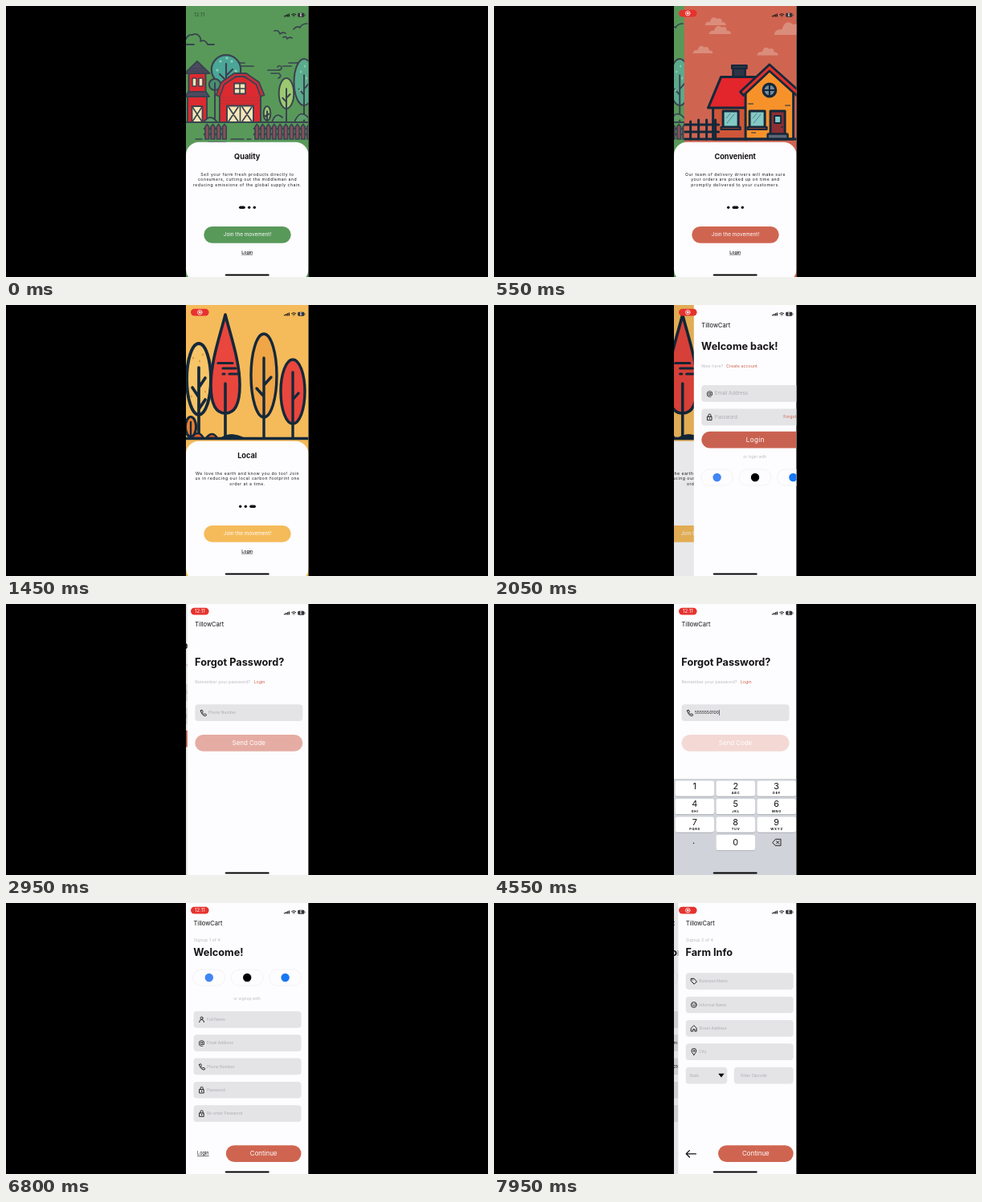
An HTML page with a canvas that plays this animation: 600x338 px, repeating every 8000 ms.

```html
<!DOCTYPE html>
<html lang="en">
<head>
<meta charset="utf-8">
<title>Farm app walkthrough</title>
<style>
html, body { margin: 0; width: 100%; height: 100%; overflow: hidden; background: #000; }
canvas { display: block; width: 600px; height: 338px; }
</style>
</head>
<body>
<canvas id="stage"></canvas>
<script>
const LOOP = 8000, L = 224, W = 152.4, H = 338;
const RED = '#cf6551', PAPER = '#fdfcfe', TEXT = '#151314', GREY = '#bdbbc0', FIELD = '#e4e3e6';
const BRAND = 'TillowCart', PHONE = '5555550100';
const canvas = document.getElementById('stage');
const ctx = canvas.getContext('2d');
const dpr = window.devicePixelRatio || 1;
canvas.width = 600 * dpr;
canvas.height = H * dpr;
let ink = '#000';

// --- helpers ---
const clamp = (v, a = 0, b = 1) => Math.min(b, Math.max(a, v));
const ramp = (t, a, b) => clamp((t - a) / (b - a));
const smooth = (t, a, b) => { const u = ramp(t, a, b); return u * u * (3 - 2 * u); };
const typed = (s, t, start, step) => s.slice(0, clamp(Math.floor((t - start) / step), 0, s.length));

function paint(fill, lw, p) {
  if (fill) { ctx.fillStyle = fill; p ? ctx.fill(p) : ctx.fill(); }
  if (lw) {
    ctx.strokeStyle = ink;
    ctx.lineWidth = lw;
    p ? ctx.stroke(p) : ctx.stroke();
  }
}
function path(d, fill, lw) { paint(fill, lw, new Path2D(d)); }
function oval(x, y, rx, ry, fill, lw) {
  ctx.beginPath();
  ctx.ellipse(x, y, rx, ry, 0, 0, 7);
  paint(fill, lw);
}
function box(x, y, w, h, r, fill, lw) {
  ctx.beginPath();
  ctx.roundRect(x, y, w, h, r);
  paint(fill, lw);
}
function txt(s, x, y, size, o = {}) {
  ctx.font = `${o.w || 400} ${size}px Inter, sans-serif`;
  ctx.letterSpacing = (o.ls || 0) + 'px';
  ctx.textAlign = o.a || 'left';
  ctx.textBaseline = 'middle';
  ctx.fillStyle = o.c || TEXT;
  ctx.fillText(s, x, y);
  const w = ctx.measureText(s).width;
  if (o.u) ctx.fillRect(o.a === 'center' ? x - w / 2 : x, y + size * .46, w, .6);
  return w;
}
const mid = (s, x, y, size, o) => txt(s, x, y, size, { a: 'center', ...o });

function button(s, y, alpha = 1, x = 233.5, w = 134, fill = RED, size = 7.9, ls = 0) {
  ctx.save();
  ctx.globalAlpha = alpha;
  box(x, y, w, 20.7, 10.3, fill);
  ctx.restore();
  mid(s, x + w / 2, y + 10.4, size, { c: '#fff', ls });
}

// --- illustrations ---
function fence(x0, x1) {
  path(`M${x0 - 1} 153H${x1}M${x0 - 1} 160H${x1}`, null, 2.6);
  for (let x = x0; x < x1 - 2; x += 7.2) path(`M${x} 166v-15.5l2.3-3l2.3 3v15.5z`, '#8a4f5c', 1.7);
}
function leafTree(x, y, rx, ry, fill, base) {
  oval(x, y, rx, ry, fill, 2);
  path(`M${x} ${y - ry * .3}V${base}M${x} ${y + ry * .3}l${rx * .5}-${ry * .25}M${x} ${y + ry * .55}l-${rx * .5}-${ry * .25}`, null, 2);
}
function farm() {
  ink = '#39434f';
  path('M224 41q3-6 8-5q5-3 9 2q2 3 1 6q6-3 9 4h8M224 48h10', null, 1.8);
  path('M286 71h11M289 75h19M326 80h12q6 0 5-4q-3-3-5 0M330 84h10q4 4-1 6M352 71h9q5-1 3 4M345 75h10', null, 1.7);
  path('M334 31q5-2 7 4q3-3 7-1M345 39q4-2 5 2q3-3 6-1M358 29q4-5 8-2q2-5 9-5', null, 1.7);
  // round trees
  oval(274, 79.3, 18.2, 18.2, '#4aa696', 2.2);
  path('M274 72v38M274 87l8-8M274 93l-8-8', null, 2.2);
  for (const [x, y] of [[267, 69], [281, 69], [286, 81], [263, 80], [275, 65]]) oval(x, y, 1.6, 1.6, '#8fd0b8');
  oval(260, 98, 7.2, 7, '#4b8f71', 2);
  path('M260 96v48', null, 2);
  // tower
  box(227.5, 84, 21, 24, 0, '#dc2a30', 2);
  path('M222.5 84L238 69L253.5 84z', '#4d4a61', 2);
  path('M231 78h14M228 81h20', null, 1);
  box(232, 90, 5, 10, 1, '#f5e5b6', 1.5);
  box(240, 90, 5, 10, 1, '#f5e5b6', 1.5);
  box(226, 112, 24, 33, 0, '#dc2a30', 2);
  path('M227 107h22l4 6h-30z', '#4d4a61', 1.8);
  box(231.5, 125, 13, 20, 0, '#f5e5b6', 1.8);
  path('M231.5 125l13 20M244.5 125l-13 20', null, 1.6);
  // barn
  path('M266 145V108L272 95L291.5 86L311 95L317 108V145z', '#dc2a30', 2);
  path('M261.5 111L268 95L284 84H299L315 95L321.5 111L317 113L311.5 98L297 88H286L271.5 98L266 113z', '#c82f3a', 1.8);
  ctx.save();
  ctx.globalAlpha = .35;
  for (let y = 114; y < 124; y += 4) path(`M268 ${y}h47`, null, .7);
  ctx.restore();
  box(284, 96.5, 14, 13, 0, '#f5e5b6', 1.8);
  path('M291 96.5v13M284 103h14', null, 1.5);
  box(275, 124.5, 33, 20.5, 0, '#f5e5b6', 2);
  path('M291.5 125v20M277 126l12 18M289 126l-12 18M294 126l12 18M306 126l-12 18', null, 1.7);
  // right side
  leafTree(371, 95, 12.5, 29, '#5aab8b', 145);
  leafTree(349, 109, 9.3, 19, '#9cc870', 145);
  leafTree(325, 134, 4.3, 9, '#9cc870', 145);
  for (const [x, y] of [[367, 82], [374, 90], [366, 105], [372, 75]]) oval(x, y, 1, 1.5, '#8fd0b8');
  path('M331 145q5-14 13-6M359 145q7-18 18-5M246 145q8-12 17 0', '#5f9f6a', 1.8);
  path('M223 145h154', null, 2.2);
  fence(248, 274);
  fence(310, 378);
  path('M236 166h8M280 166h16M300 166h5M252 170h22', null, 1.4);
}
function puff(x, y, s) {
  path(`M${x} ${y}q${s} ${-5 * s} ${6 * s} ${-4 * s}q${3 * s} ${-9 * s} ${9 * s} ${-4 * s}q${6 * s} ${-2 * s} ${6 * s} ${4 * s}q${5 * s} 0 ${5 * s} ${4 * s}z`, '#db8d7c');
}
function house() {
  ink = '#14283a';
  ctx.save();
  ctx.translate(32, 0);
  puff(218, 24, 1);
  puff(223, 35, 1.05);
  puff(304, 36, 1.6);
  puff(283, 61.5, 1);
  puff(203, 59, .95);
  oval(347, 126.5, 12, 15, '#43b35a', 3);
  path('M345 122v44', null, 2.5);
  box(253, 77, 15, 14, 0, '#2c3447', 2.6);
  box(251.5, 74, 18.5, 4, 0, '#2c3447', 2.2);
  box(228, 124, 42, 42, 0, '#cf5639', 3);
  path('M222 127L238 88.5H285L268 127z', '#e2262c', 3.2);
  path('M268.5 166V106L298.5 77L328 106V166z', '#f7922b', 3);
  path('M262 107L298.3 73L336 107L332 111.5L298.3 81L266 111.5z', '#e2302c', 2.8);
  oval(298.3, 105, 7.8, 7.8, '#75899f', 3.2);
  path('M298.3 98v14M291 105h15', null, 2);
  for (const x of [240.5, 273.5]) {
    box(x, 131, 19, 20, 0, '#85c9c6', 3);
    path(`M${x + 5} 147l10-12M${x + 4} 141l6-6`, '', 0);
    box(x - 2.5, 151, 24, 3, 0, '#8a4136', 2.2);
    ctx.save();
    ctx.globalAlpha = .5;
    path(`M${x + 5} 146l9-11M${x + 4} 140l5-6`, null, .9);
    ctx.restore();
  }
  box(299.5, 131, 18, 30, 0, '#8c2f33', 3);
  box(304.5, 137, 8, 9, 0, '#85c9c6', 2);
  oval(314, 151, 1, 1, ink);
  box(296, 159.5, 25, 6.5, 1, '#5d6675', 2.4);
  path('M272 122h6M318 124h6M276 158h5', null, 1);
  path('M191 148h44M191 157h44M200 166v-22M210 166v-24M220 166v-24M231 166v-24', null, 3);
  path('M191 166h154', null, 3.2);
  ctx.restore();
}
function grove() {
  ink = '#14283a';
  oval(321, 88, 16, 52, '#f0a546', 3.4);
  path('M321 66V166M321 100l9-10M321 114l-9-10', null, 3.4);
  oval(357, 108, 15, 40, '#e9463d', 3.4);
  path('M357 84V166M357 118l7-8', null, 3.4);
  // tall oval tree
  oval(240, 92.5, 15, 44.5, '#f7c468', 3.9);
  path('M240 78V166M240 103l8-12M240 115l-8-12M240 130l8-12', null, 3.7);
  for (const [x, y] of [[233, 66], [245, 62], [248, 108], [231, 114], [241, 70]]) oval(x, y, 1.1, 1.6, '#dc9a43');
  oval(230, 152, 6.6, 12.5, '#ed7f2f', 3.2);
  path('M230 146V166', null, 2.4);
  path('M231 166q8-12 15 0z', '#e5592f', 2.6);
  path('M249 166q8-10 14 0z', '#e5592f', 2.6);
  // pointed tree
  path('M273 12C266 40 255 70 255 100C255 124 262 135 273 135C284 135 291 124 291 100C291 70 280 40 273 12z', '#e9463d', 3.6);
  path('M273 98V166', null, 3.6);
  path('M264 72.5h18M270 79h16M278 86h10M270 86h2', null, 3.2);
  path('M267 166q12-9 30 0z', ink, 1);
  path('M223 166.5h154', null, 3.6);
}

const intro = [
  { name: 'Quality', fill: '#589959', art: farm, lines: ['Sell your farm fresh products directly to', 'consumers, cutting out the middleman and', 'reducing emissions of the global supply chain.'] },
  { name: 'Convenient', fill: RED, art: house, lines: ['Our team of delivery drivers will make sure', 'your orders are picked up on time and', 'promptly delivered to your customers.'] },
  { name: 'Local', fill: '#f5bb5a', art: grove, lines: ['We love the earth and know you do too! Join', 'us in reducing our local carbon footprint one', 'order at a time.'] }
];

// --- pages ---
function introPage(t) {
  const pos = smooth(t, 230, 620) + smooth(t, 888, 1268);
  const cur = Math.round(pos), info = intro[cur];
  intro.forEach((page, i) => {
    const dx = (i - pos) * W;
    if (Math.abs(dx) >= W) return;
    ctx.save();
    ctx.translate(dx, 0);
    ctx.beginPath();
    ctx.rect(L, 0, W + .4, H);
    ctx.clip();
    ctx.fillStyle = page.fill;
    ctx.fillRect(L, 0, W + .4, H);
    page.art();
    ctx.restore();
  });
  box(L, 169.7, W, 175, 16, PAPER);
  mid(info.name, 300.2, 188.3, 9.2, { w: 700 });
  info.lines.forEach((s, i) => mid(s, 300.5, 210 + i * 6.6, 5.1, { ls: .51 }));
  let x = 290;
  for (let i = 0; i < 3; i++) {
    const w = i === cur ? 7.8 : 3.4;
    box(x, 249.5, w, 3.4, 1.7, TEXT);
    x += w + 3.2;
  }
  button('Join the movement!', 275, 1, 246.3, 108.4, info.fill, 6.4);
  mid('Login', 300.2, 307.3, 5.3, { u: true, w: 500 });
}
function heading(title, y) {
  txt(BRAND, 233.5, 26, 7.5);
  txt(title, 233.3, y, 12.7, { w: 700 });
}
function hint(s, link, x, y) {
  txt(s, 233.5, y, 5.35, { c: GREY });
  txt(link, x, y, 5.35, { c: RED });
}
const icons = {
  at: (x, y) => mid('@', x, y, 8.2, { w: 500 }),
  lock: (x, y) => path(`M${x - 2.6} ${y - .6}h5.2v4.4h-5.2zM${x - 1.6} ${y - .6}v-1.6a1.6 1.6 0 0 1 3.2 0v1.6M${x} ${y + 1}v1.2`, null, .9),
  phone: (x, y) => path(`M${x - 3} ${y - 2.4}l1.6-1l1.3 2l-.9 1.1q.8 1.7 2.3 2.5l1.1-.9l1.9 1.4l-1.1 1.5q-5-.3-6.2-6.6z`, null, .9),
  tag: (x, y) => { path(`M${x - 3.3} ${y - 3.3}h3.4l3.6 3.6l-3.3 3.3l-3.7-3.6z`, null, 1); oval(x - 1.5, y - 1.5, .6, .6, TEXT); },
  smile: (x, y) => { oval(x, y, 3.4, 3.4, null, .9); path(`M${x - 1.6} ${y + .7}q1.6 1.8 3.2 0M${x - 1.2} ${y - 1.4}v.6M${x + 1.2} ${y - 1.4}v.6`, null, .8); },
  home: (x, y) => path(`M${x - 3.3} ${y - .3}l3.3-3.3l3.3 3.3v4h-2.2v-2.6h-2.2v2.6h-2.2z`, null, .9),
  pin: (x, y) => { path(`M${x} ${y + 3.8}q-3-3.2-3-5a3 3 0 0 1 6 0q0 1.8-3 5z`, null, .9); oval(x, y - 1.2, 1.1, 1.1, null, .8); },
  user: (x, y) => { oval(x, y - 1.7, 1.6, 1.6, null, .9); path(`M${x - 3} ${y + 3.4}q0-3.2 3-3.2q3 0 3 3.2`, null, .9); }
};
function field(y, icon, label, value = '', size = 4.9) {
  box(233.5, y, 134, 20.7, 4, FIELD);
  ink = TEXT;
  icons[icon](243.6, y + 10.3);
  return txt(value || label, 250, y + 10.6, size, { c: value ? TEXT : '#aeadb1' });
}
function social(y) {
  ink = '#f0eff1';
  ['#4285f4', '#000', '#1877f2'].forEach((c, i) => {
    const x = 252.8 + i * 47.4;
    box(x - 20, y - 10, 40, 20, 10, PAPER, .8);
    oval(x, y, 5.2, 5.2, c);
  });
}
function loginPage() {
  heading('Welcome back!', 52);
  hint('New here?', 'Create account', 264.3, 76);
  field(100, 'at', 'Email Address', '', 6.15);
  field(129.5, 'lock', 'Password', '', 6.1);
  txt('Forgot?', 335.4, 139.8, 5.3, { c: RED });
  button('Login', 157.8, 1, 233.5, 134, '#c96150', 8.1, .4);
  mid('or login with', 300, 189, 5, { c: GREY });
  social(215);
}
function forgotPage(t) {
  const value = typed(PHONE, t, 3720, 62);
  heading('Forgot Password?', 72.7);
  hint('Remember your password?', 'Login', 306.8, 97);
  const w = field(125.2, 'phone', 'Phone Number', value, value ? 5.1 : 4.9);
  if (t > 3500 && t < 4640) box(250.3 + (value ? w : 0), 132, .7, 7, 0, '#3b4a6b');
  button('Send Code', 163, .52 + .48 * ramp(t, 4400, 4450) - .76 * ramp(t, 4470, 4540));
}
function otpPage(t) {
  const n = clamp(Math.floor((t - 5430) / 65), 0, 5);
  heading('Verify OTP', 72.7);
  hint('Remember your password?', 'Login', 306.8, 97);
  for (let i = 0; i < 5; i++) {
    const x = 233.5 + i * 28.35;
    box(x, 121, 20.6, 20.7, 4, FIELD);
    if (i < n) mid('8', x + 10.3, 131.6, 9.5);
  }
  if (t > 5250 && t < 6130) {
    const at = Math.min(n, 4);
    box(243.8 + at * 28.35 + (n > 4 ? 3 : 0), 126, .8, 11, 0, '#3b7fd0');
  }
  button('Submit', 154.4, .5 + .5 * ramp(t, 5750, 5880) - .75 * ramp(t, 6020, 6090));
  mid('Resend Code', 300.3, 187, 5.6, { u: true, w: 500 });
}
function signupPage(t) {
  txt('Signup 1 of 4', 233.5, 46.5, 5.4, { c: GREY });
  heading('Welcome!', 62.6);
  social(93);
  mid('or signup with', 300, 119, 5, { c: GREY });
  const secret = '\u2022'.repeat(5);
  [['user', 'Full Name', 'Ivo', 6920],
   ['at', 'Email Address', 'ivo@farm.example', 7000],
   ['phone', 'Phone Number', PHONE, 7200],
   ['lock', 'Password', secret, 7340],
   ['lock', 'Re-enter Password', secret, 7440]
  ].forEach(([icon, label, value, start], i) =>
    field(135 + i * 29.3, icon, label, typed(value, t, start, 12)));
  txt('Login', 238, 312.6, 5.6, { u: true });
  button('Continue', 302.2, 1 - .7 * ramp(t, 7600, 7660) + .7 * ramp(t, 7680, 7730), 273.8, 93.7);
}
function farmInfoPage() {
  txt('Signup 2 of 4', 233.5, 46.5, 5.4, { c: GREY });
  heading('Farm Info', 62.6);
  [['tag', 'Business Name'], ['smile', 'Informal Name'], ['home', 'Street Address'], ['pin', 'City']]
    .forEach(([icon, label], i) => field(87.3 + i * 29.35, icon, label));
  box(233.5, 204.8, 51.5, 20.7, 4, FIELD);
  txt('State', 238, 215.3, 4.9, { c: '#aeadb1' });
  path('M274 212.8h7.4l-3.7 4.6z', '#000');
  box(293.6, 204.8, 73.9, 20.7, 4, FIELD);
  txt('Enter Zipcode', 302, 215.3, 4.9, { c: '#aeadb1' });
  ink = TEXT;
  path('M246.2 312.8h-12M238.2 308.6l-4.2 4.2l4.2 4.2', null, 1.3);
  button('Continue', 302.2, 1, 273.8, 93.7);
}

const pages = [
  [0, introPage], [1909, loginPage], [2670, forgotPage],
  [4640, otpPage], [6130, signupPage], [7725, farmInfoPage]
];
function showPage(draw, t, dx, dim) {
  ctx.save();
  ctx.translate(dx, 0);
  ctx.fillStyle = PAPER;
  ctx.fillRect(L, 0, W + .4, H);
  draw(t);
  ctx.fillStyle = `rgba(0,0,0,${dim})`;
  ctx.fillRect(L, 0, W + .4, H);
  ctx.restore();
}

// --- system parts ---
function keyboard(up, bar) {
  if (up <= 0) return;
  ctx.save();
  ctx.translate(0, (1 - up) * (bar ? 139 : 120));
  if (bar) {
    box(L, 199, W, 20, 0, '#f2f2f5');
    box(L, 198.8, W, .5, 0, '#d5d6da');
    txt('Done', 354, 209, 6.9, { w: 600, c: '#1d74b8' });
  }
  box(L, 218, W, 120, 0, '#d0d3d9');
  const letters = ['', 'ABC', 'DEF', 'GHI', 'JKL', 'MNO', 'PQRS', 'TUV', 'WXYZ'];
  const key = (col, row, s, sub) => {
    const x = 225.4 + col * 51, y = 220.5 + row * 22.5;
    box(x, y + .7, 48.6, 19.3, 2.4, '#9a9da4');
    box(x, y, 48.6, 19.3, 2.4, '#fff');
    mid(s, x + 24.3, y + (row < 3 ? 7 : 9.7), 10.8);
    if (sub) mid(sub, x + 24.6, y + 15.3, 4, { w: 700, ls: .7 });
  };
  letters.forEach((s, i) => key(i % 3, i / 3 | 0, String(i + 1), s));
  key(1, 3, '0');
  mid('.', 248.5, 296, 11);
  ink = TEXT;
  path('M347 297.3l3.4-4h6.6v8h-6.6zM351.5 295.6l3.4 3.4M354.9 295.6l-3.4 3.4', null, .9);
  ctx.restore();
}
function statusBar(t) {
  if (t < 450) txt('12:11', 234.2, 11.2, 5.7, { c: '#2b4a30', ls: .2 });
  else {
    box(230, 4.7, 22.6, 8.8, 4.4, '#e6322e');
    if (t > 2450 && t < 7250) mid('12:11', 241.4, 9.2, 6, { c: '#fff' });
    else {
      ink = '#fff';
      oval(241.3, 9.1, 2.8, 2.8, null, .8);
      oval(241.3, 9.1, 1.3, 1.3, '#fff');
    }
  }
  for (let i = 0; i < 4; i++) box(346 + i * 1.9, 11.9 - i * .8, 1.3, 1.5 + i * .8, .3, TEXT);
  ink = TEXT;
  path('M355.6 10.5q2.6-2.2 5.2 0M356.8 11.8q1.4-1.2 2.8 0', null, .9);
  oval(358.2, 13, .6, .6, TEXT);
  box(363.2, 8.8, 8.2, 5, 1.4, '#33333a');
  box(371.8, 10.4, .7, 1.8, .3, '#33333a');
  mid('6', 367.2, 11.4, 4.2, { c: '#fff', w: 600 });
}

function render() {
  const t = performance.now() % LOOP;
  ctx.setTransform(dpr, 0, 0, dpr, 0, 0);
  ctx.fillStyle = '#000';
  ctx.fillRect(0, 0, 600, H);
  ctx.save();
  ctx.beginPath();
  ctx.rect(L, 0, W, H);
  ctx.clip();
  ctx.lineJoin = ctx.lineCap = 'round';

  const k = pages.findLastIndex(p => t >= p[0]);
  // critically damped push: share of the way still to go
  const z = (t - pages[k][0]) * .023;
  const left = k ? (1 + z) * Math.exp(-z) : 0;
  if (k && left > .002) showPage(pages[k - 1][1], t, -.3 * W * (1 - left), .1 * (1 - left));
  showPage(pages[k][1], t, left * W, 0);

  keyboard(smooth(t, 3450, 3700) - smooth(t, 4620, 4800), false);
  keyboard(smooth(t, 5180, 5400) - smooth(t, 6130, 6300), true);
  statusBar(t);
  box(272.7, 334.4, 55, 2.2, 1.1, '#000');
  ctx.restore();
  requestAnimationFrame(render);
}
render();
</script>
</body>
</html>
```
